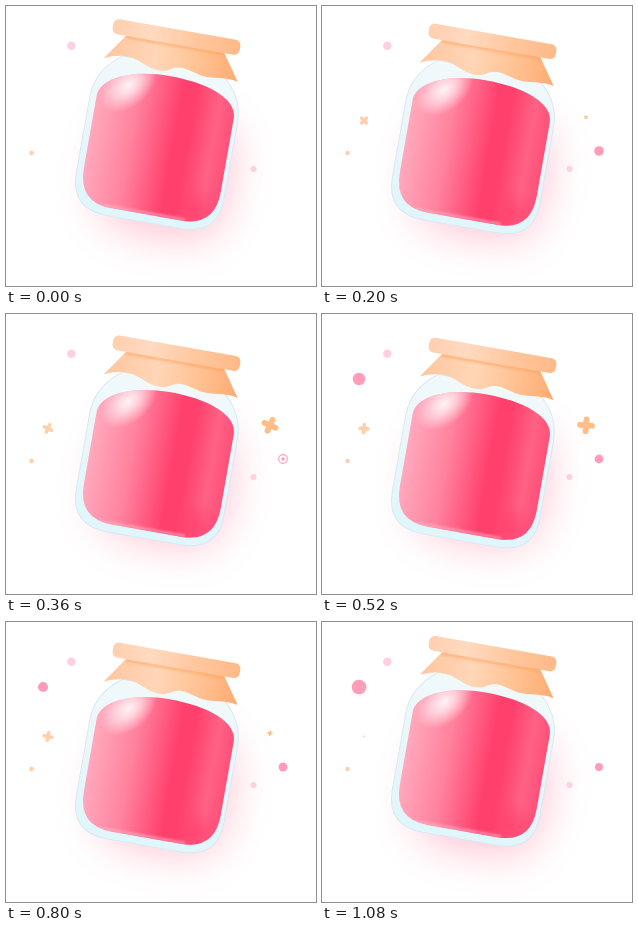
Recreate the animation shown at these times as an HTML page. Size 310 by 280 pixels, loop 1.12 s.

```html
<!DOCTYPE html>
<html lang="en">
<head>
<meta charset="utf-8">
<title>Jam jar</title>
<style>
html, body { margin: 0; width: 100%; height: 100%; overflow: hidden; background: #fff; }
svg { display: block; }
</style>
</head>
<body>
<svg width="310" height="280" viewBox="0 0 310 280">
  <defs>
    <filter id="glow" x="-80%" y="-80%" width="260%" height="260%"><feGaussianBlur stdDeviation="22"/></filter>
    <filter id="soft" filterUnits="userSpaceOnUse" x="-80" y="-20" width="160" height="220"><feGaussianBlur stdDeviation="1.2"/></filter>
    <linearGradient id="glass" x2="0" y2="1">
      <stop stop-color="#f1f9fa"/><stop offset=".5" stop-color="#e9f6fa"/><stop offset="1" stop-color="#dff6fa"/>
    </linearGradient>
    <linearGradient id="jam">
      <stop stop-color="#ffa9bd"/><stop offset=".3" stop-color="#ff829e"/>
      <stop offset=".61" stop-color="#ff3f6c"/><stop offset=".7" stop-color="#ff3f6c"/>
      <stop offset=".88" stop-color="#ff6285"/><stop offset="1" stop-color="#ff5079"/>
    </linearGradient>
    <linearGradient id="lid">
      <stop stop-color="#ffcfb0"/><stop offset=".3" stop-color="#ffdac0"/>
      <stop offset=".65" stop-color="#ffc79e"/><stop offset="1" stop-color="#ffb987"/>
    </linearGradient>
    <linearGradient id="cloth">
      <stop stop-color="#ffc6a0"/><stop offset=".38" stop-color="#ffd6b7"/>
      <stop offset=".65" stop-color="#ffc598"/><stop offset="1" stop-color="#ffab70"/>
    </linearGradient>
    <radialGradient id="shine">
      <stop stop-color="#fff" stop-opacity=".9"/><stop offset=".4" stop-color="#fff" stop-opacity=".6"/>
      <stop offset="1" stop-color="#fff" stop-opacity="0"/>
    </radialGradient>
    <radialGradient id="depth">
      <stop stop-color="#ff3d6b" stop-opacity=".7"/><stop offset="1" stop-color="#ff3d6b" stop-opacity="0"/>
    </radialGradient>
    <path id="fill" d="M-68.5 72C-68.5 52-35 39.5 0 39.5C38 39.5 70.5 50 70.5 70V145Q70.5 180 36 180H-34Q-68.5 180-68.5 145Z"/>
    <path id="drape" d="M-49 6L-68 33.5C-58 29-52 27.5-42 28S-24 36-12 36S0 29.5 10 29.5S26 34 37 34S56 30.5 68 33.5L49 6Z"/>
    <clipPath id="inFill"><use href="#fill"/></clipPath>
    <clipPath id="inDrape"><use href="#drape"/></clipPath>
  </defs>

  <rect x="-62" y="-60" width="124" height="120" rx="35" transform="translate(160 168) rotate(10)"
    fill="#ff6d92" opacity=".42" filter="url(#glow)"/>

  <g fill="#ffd0e1">
    <circle cx="65.3" cy="39.7" r="4.2"/>
    <circle cx="247.5" cy="163" r="3"/>
    <circle cx="25.5" cy="147" r="2.2" fill="#ffcdb0"/>
  </g>

  <g id="jar">
    <path d="M-50 28C-66 40-75 54-75 74V151Q-75 188-37 188H37Q75 188 75 151V74C75 54 66 40 50 28Z"
      fill="url(#glass)" stroke="#d9e9f1"/>
    <use href="#fill" fill="url(#jam)"/>
    <g clip-path="url(#inFill)">
      <ellipse rx="33" ry="21" transform="translate(-39 56) rotate(-50)" fill="url(#shine)"/>
      <circle cx="48" cy="168" r="26" fill="url(#depth)"/>
      <path d="M-48 178.5H40" stroke="#ffb3c6" stroke-width="2.5" opacity=".7" filter="url(#soft)"/>
    </g>
    <use href="#drape" fill="url(#cloth)"/>
    <g clip-path="url(#inDrape)">
      <path d="M-50 8.5H50" stroke="#ffa25c" stroke-width="3" opacity=".6" filter="url(#soft)"/>
    </g>
    <rect x="-64.5" y="-7.5" width="129" height="15" rx="5.5" fill="url(#lid)"/>
  </g>

  <g id="dots"></g>
  <g id="crosses" stroke-linecap="round"></g>
</svg>
<script>
const LOOP = 1120, STEP = 40;
const $ = id => document.getElementById(id);

function add(parent, tag, attrs) {
  const el = document.createElementNS('http://www.w3.org/2000/svg', tag);
  for (const k in attrs) el.setAttribute(k, attrs[k]);
  return parent.appendChild(el);
}

const ramp = (t, a, b) => Math.min(1, Math.max(0, (t - a) / (b - a)));
const easeOut = p => Math.sin(p * Math.PI / 2);

// Linear interpolation through [time, value] pairs
function track(keys, t) {
  let v = keys[0][1];
  for (let i = 1; i < keys.length; i++) {
    v += (keys[i][1] - keys[i - 1][1]) * ramp(t, keys[i - 1][0], keys[i][0]);
  }
  return v;
}

// A disc pops in, is hollowed out, then refills from its centre
const dots = [
  { x: 277, y: 145, r: 4.9, delay: 60 },
  { x: 37, y: 65, r: 7.5, delay: 420 }
];
for (const d of dots) {
  d.rings = ['#ff9db9', '#fff', '#ff9db9'].map(fill => add($('dots'), 'circle', { cx: d.x, cy: d.y, fill }));
}

function drawDot({ r, delay, rings }, t) {
  const s = t - delay;
  const hole = ramp(s, 180, 335);
  const radii = [
    hole < 1 ? easeOut(ramp(s, 0, 160)) : 0,
    hole < 1 ? hole : 0,
    easeOut(ramp(s, 220, 560)) - .18 * ramp(s, 620, 860)
  ];
  rings.forEach((ring, i) => ring.setAttribute('r', r * radii[i]));
}

const spin = [[80, 60], [200, 45], [360, 25], [520, 5], [680, -40], [920, -118], [1120, -180]];
const crosses = [
  { x: 42, y: 114.5, arm: 3.9, width: 3.6, color: '#ffcfad',
    size: [[80, 0], [200, .9], [320, 1], [960, 1], [1090, .12], [1120, 0]] },
  { x: 264, y: 111.3, arm: 6, width: 5.8, color: '#ffbe87',
    size: [[160, 0], [200, .25], [320, 1], [640, 1], [680, .94], [860, 0]] }
];
for (const c of crosses) {
  const a = c.arm;
  c.el = add($('crosses'), 'path', { d: `M${-a} 0H${a}M0 ${-a}V${a}`, stroke: c.color, 'stroke-width': c.width });
}

function draw(now) {
  const t = Math.floor(now % LOOP / STEP) * STEP;
  const wave = Math.sin(Math.PI * t / LOOP);
  const bob = 10.5 * (wave + wave * wave) / 2;
  $('jar').setAttribute('transform', `translate(170.5 ${31 + bob}) rotate(10)`);
  for (const d of dots) drawDot(d, t);
  for (const c of crosses) {
    c.el.setAttribute('transform',
      `translate(${c.x} ${c.y}) rotate(${track(spin, t)}) scale(${track(c.size, t)})`);
  }
  requestAnimationFrame(draw);
}
draw(0);
</script>
</body>
</html>
```
